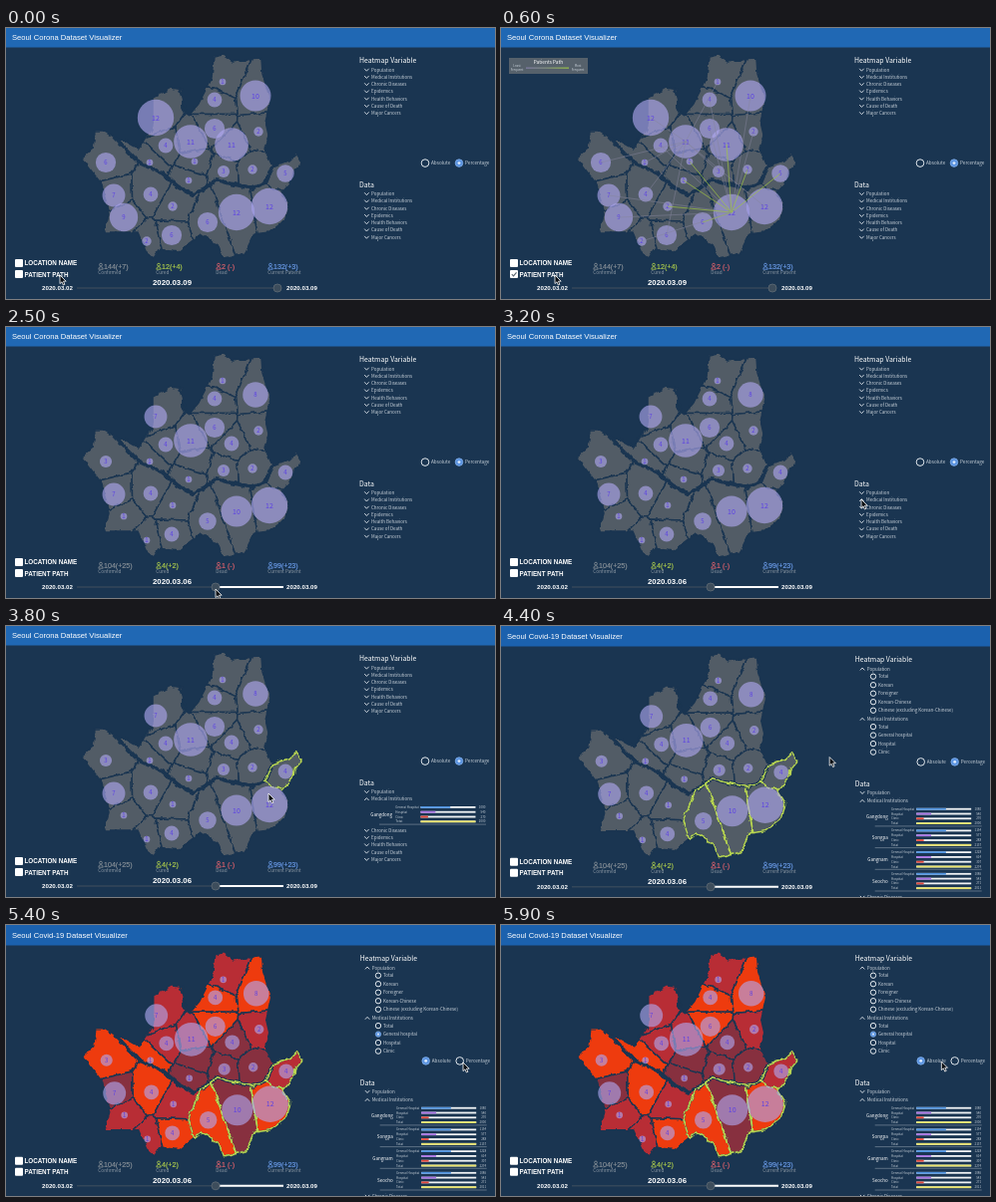
An HTML page for the animation above (6000 ms loop, 490x272 px).

```html
<!DOCTYPE html>
<html lang="en">
<head>
<meta charset="utf-8">
<title>Seoul Dataset Visualizer</title>
<style>
html, body { margin: 0; width: 100%; height: 100%; overflow: hidden; background: #1a3551; }
svg { display: block; width: 100vw; height: 100vh; }
text { white-space: pre; }
.n { font-family: "Noto Sans CJK KR", "Noto Sans CJK JP", "Noto Sans CJK", "Noto Sans", sans-serif; }
.h { font-family: "Liberation Sans", Arial, sans-serif; }
</style>
</head>
<body>
<svg id="stage" viewBox="0 0 490 272" xmlns="http://www.w3.org/2000/svg"></svg>
<script>
const LOOP = 6000, STEP = 100, CUT = 4300;
const BG = '#1a3551', PALE = '#c9d2da', BLUE = '#5a93e0';
const BOLD = 'font-weight="700"', MID = 'text-anchor="middle"', END = 'text-anchor="end"';
const lerp = (a, b, k) => a + (b - a) * k;

// River from west to east; both shores start at its east end and return to its west end.
const points = s => s.split(' ').map(p => p.split(',').map(Number));
const river = points('108,109 133,135 157,146 172,159 187,167 200,161 210,152 224,156 247,161 260,156 267,139');
const northShore = points('259,121 263,108 260,95 265,72 257,46 256,30 240,31 227,34 217,27 208,29 206,50 193,76 184,87 177,82 176,62 165,60 147,70 147,98 140,110 133,121 119,113');
const southShore = points('285,132 291,126 297,135 289,144 288,151 276,165 284,178 281,192 264,205 249,207 240,226 218,232 213,219 195,207 172,225 154,222 148,231 140,224 132,205 98,205 103,187 96,157 76,131 87,121 89,104 100,104');

// name, bubble centre, cases on day 6 and day 9
const north = `Dobong 217 54 1 1,Nowon 250 68 8 10,Gangbuk 209 72 4 4,Eunpyeong 150 90 7 12,Seongbuk 209 101 6 6,
Jungnang 253 104 2 2,Jongno 185 114 11 11,Dongdaemun 226 117 4 11,Seodaemun 160 118 4 4,Mapo 144 135 1 1,
Jung 189 134 0 1,Yongsan 183 153 1 1,Seongdong 218 144 3 3,Gwangjin 247 142 2 2`;
const south = `Gangdong 280 146 4 5,Songpa 264 179 12 12,Gangnam 231 185 10 12,Seocho 202 195 5 6,Gangseo 100 135 3 6,
Yangcheon 108 168 7 7,Guro 118 190 1 9,Yeongdeungpo 145 167 4 4,Dongjak 167 179 1 2,Geumcheon 141 214 1 2,Gwanak 166 208 4 6`;

// Keep the part of a polygon that is nearer to a than to b.
function nearer(poly, a, b) {
  const side = ([x, y]) => (x - (a.x + b.x) / 2) * (b.x - a.x) + (y - (a.y + b.y) / 2) * (b.y - a.y);
  return poly.flatMap((p, i) => {
    const q = poly[(i + 1) % poly.length], u = side(p), v = side(q), k = u / (u - v);
    const kept = u <= 0 ? [p] : [];
    if (u * v < 0) kept.push([lerp(p[0], q[0], k), lerp(p[1], q[1], k)]);
    return kept;
  });
}
function divide(list, shore) {
  const all = list.split(/,\s*/).map(row => {
    const [name, ...nums] = row.split(' '), [x, y, early, late] = nums.map(Number);
    return { name, x, y, early, late };
  });
  for (const a of all)
    a.shape = all.filter(b => b !== a).reduce((poly, b) => nearer(poly, a, b), [...shore, ...river]).join(' ');
  return all;
}
const districts = [...divide(north, northShore), ...divide(south, southShore)];
const find = name => districts.find(d => d.name === name);

// Heat classes; districts not listed are plain red.
const heat = {
  share: {
    '#5c3c4a': 'Dobong Nowon Gangseo Geumcheon',
    '#87303f': 'Guro Gwangjin Gangnam Seongdong Yongsan Jung Jongno',
    '#ee3b0e': 'Seodaemun Yangcheon Seocho Songpa Gangdong'
  },
  count: {
    '#87303f': 'Yangcheon Jung Seongdong Gwangjin Yongsan Gangnam Dongdaemun',
    '#ee3b0e': 'Nowon Gangbuk Seongbuk Mapo Gangseo Yeongdeungpo Gwanak Seocho Songpa'
  }
};
function heatOf(name, mode) {
  const hit = Object.entries(heat[mode]).find(([, names]) => names.split(' ').includes(name));
  return hit ? hit[0] : '#b82d35';
}

const picks = ['Gangdong', 'Songpa', 'Gangnam', 'Seocho'];
const topics = ['Population', 'Medical Institutions', 'Chronic Diseases', 'Epidemics', 'Health Behaviors', 'Cause of Death', 'Major Cancers'];

// time, x, y of the pointer tip
const pointer = [[0, 54, 248], [1600, 54, 248], [1900, 272, 262], [2400, 210, 263], [2600, 210, 263], [3200, 361, 173],
  [3600, 281, 150], [3800, 263, 168], [4200, 204, 196], [4500, 373, 109], [4700, 413, 121], [5000, 420, 136],
  [5400, 458, 138], [6000, 440, 137]];
function pointerAt(t) {
  const i = pointer.findIndex(p => p[0] > t);
  const [t0, x0, y0] = pointer[i - 1], [t1, x1, y1] = pointer[i];
  const k = (t - t0) / (t1 - t0), e = k * k * (3 - 2 * k);
  return [lerp(x0, x1, e), lerp(y0, y1, e)];
}

const text = (x, y, s, size, fill = '#fff', more = '', face = 'n') =>
  `<text class="${face}" x="${x}" y="${y + size * .36}" font-size="${size}" fill="${fill}" ${more}>${s}</text>`;
const sans = (x, y, s, size, fill, more) => text(x, y, s, size, fill, more, 'h');
const circle = (x, y, r, more) => `<circle cx="${x}" cy="${y}" r="${r}" ${more}/>`;
const rect = (x, y, w, h, fill, more = '') => `<rect x="${x}" y="${y}" width="${w}" height="${h}" fill="${fill}" ${more}/>`;
const line = (x1, y1, x2, y2, tint, w) => `<path d="M${x1} ${y1}L${x2} ${y2}" stroke="${tint}" stroke-width="${w}"/>`;
const shift = (x, y, body) => `<g transform="translate(${x} ${y})">${body}</g>`;

const topic = (y, name, open) => {
  const d = open ? 1.2 : -1.2;
  return `<path d="M359.2 ${y + d}l2.2 ${-2 * d}l2.2 ${2 * d}" fill="none" stroke="#dde4ea" stroke-width=".9"/>`
    + text(366, y, name, 4.5, PALE);
};
const radio = (x, y, r, on, name, size) => (on
  ? circle(x, y, r, `fill="${BLUE}" stroke="#86b3ee" stroke-width=".7"`) + circle(x, y, r * .38, 'fill="#dceafd"')
  : circle(x, y, r, 'fill="none" stroke="#e3e9ee" stroke-width="1"'))
  + text(x + r + 2.2, y, name, size, PALE);

// Everyone travels to one of two hubs; trips of middle length are the frequent ones.
function trips() {
  const hubs = [find('Gangnam'), find('Jongno')];
  return districts.map((d, i) => {
    const hub = hubs[i % 3 ? 0 : 1], far = Math.hypot(d.x - hub.x, d.y - hub.y);
    const often = i % 3 && far > 30 && far < 75;
    return line(d.x, d.y, hub.x, hub.y, often ? '#9fc544' : '#85859c', often ? .7 : .5);
  }).join('');
}

function mapView(s) {
  let land = '', bubbles = '';
  for (const d of districts) {
    const fill = s.heat ? heatOf(d.name, s.count ? 'count' : 'share') : '#525c66';
    land += `<polygon points="${d.shape}" fill="${fill}" stroke="${BG}" stroke-width="1.5"/>`;
    const n = Math.round(lerp(d.early, d.late, (s.day - 6) / 3));
    if (n) bubbles += circle(d.x, d.y, 2 + 1.35 * n, 'fill="#b0a8f0" fill-opacity=".62"')
      + text(d.x, d.y, n, n > 9 ? 7 : 6, '#5b40e4', MID);
  }
  land += `<polyline points="${river.join(' ')}" fill="none" stroke="${BG}" stroke-width="4"/>`;
  for (const name of s.picked)
    land += `<polygon points="${find(name).shape}" fill="none" stroke="#b9d651" stroke-width="1.5"/>`;
  return `<g stroke-linejoin="round" filter="url(#rough)">${land}</g>` + bubbles + (s.paths ? trips() : '');
}

function legend() {
  const label = (x, a, b) => text(x, 38.3, a, 3, PALE, MID) + text(x, 41.6, b, 3, PALE, MID);
  return rect(8, 30, 79, 16, '#56616b') + text(47.5, 34, 'Patients Path', 4.8, '#fff', MID)
    + label(16, 'Least', 'Frequent') + label(77, 'Most', 'Frequent') + rect(25, 39.6, 43, 1, 'url(#freq)');
}

function heatPanel(s) {
  const title = text(354, 33, 'Heatmap Variable', 6.9);
  if (!s.cut) return title + topics.map((n, i) => topic(42 + i * 7.25, n)).join('');
  const options = (y, names) => names.map((n, i) =>
    radio(372.3, y + i * 8.5, 2.7, s.heat && n === 'General hospital', n, 4.5)).join('');
  return title + topic(42.4, topics[0], true) + topic(92.7, topics[1], true)
    + options(49.9, ['Total', 'Korean', 'Foreigner', 'Korean-Chinese', 'Chinese (excluding Korean-Chinese)'])
    + options(100.3, ['Total', 'General hospital', 'Hospital', 'Clinic']);
}

const barTints = { 'General Hospital': '#4f93e0', Hospital: '#a873e4', Clinic: '#e4483c', Total: '#e9e36c' };
function bars(y, name, n) {
  const total = 2000 + n * 137 % 400;
  let out = text(387, y + 7.3, name, 4.5, '#fff', END) + line(374, y + 17.2, 481, y + 17.2, '#9fabb6', .5);
  Object.entries(barTints).forEach(([head, tint], i) => {
    const v = y + i * 4.8, share = head === 'Total' ? 1 : .54 / 2 ** i;
    out += text(390.3, v, head, 3, PALE) + rect(415.5, v - .9, 55, 1.8, '#f1f4f6')
      + rect(415.5, v - .9, 55 * share, 1.8, tint) + text(480.5, v, Math.round(total * share), 3, PALE, END);
  });
  return out;
}

function dataPanel(s) {
  const med = s.cut ? 174.8 : 173.8, n = s.picked.length;
  const rest = med + (n ? 9.7 + 21.7 * n : 7.25);
  return text(354, 158, 'Data', 6.9) + topic(166.5, topics[0]) + topic(med, topics[1], s.open)
    + s.picked.map((name, i) => bars(med + 8.1 + i * 21.7, name, i)).join('')
    + topics.slice(2).map((name, i) => topic(rest + i * 7.25, name)).join('');
}

function footer(s) {
  const at = (a, b) => Math.round(lerp(a, b, (s.day - 6) / 3));
  const cured = at(4, 12), dead = at(1, 2), all = at(104, 144);
  const stats = [
    [92, 'Confirmed', '#8b939a', `${all}(+${at(25, 7)})`],
    [150, 'Cured', '#b2d14c', `${cured}(+${at(2, 4)})`],
    [210, 'Dead', '#e3636c', `${dead} (-)`],
    [262, 'Current Patient', '#6d9fee', `${all - cured - dead + (s.day > 8 ? 2 : 0)}(+${at(23, 3)})`]
  ];
  let out = '';
  ['LOCATION NAME', 'PATIENT PATH'].forEach((name, i) =>
    out += rect(9, 232 + i * 11, 8, 8, '#fff', 'rx="1"') + sans(18.5, 236.2 + i * 11.2, name, 6.3, '#fff', BOLD));
  if (s.paths) out += '<path d="M10.8 247.2l1.7 1.7l3-3.6" fill="none" stroke="#5b6670" stroke-width="1.1"/>';
  for (const [x, name, tint, value] of stats)
    out += circle(x + 3, 237.6, 1.4, `fill="none" stroke="${tint}" stroke-width=".8"`)
      + `<path d="M${x + .8} 242.2q0-2.6 2.2-2.6t2.2 2.6z" fill="none" stroke="${tint}" stroke-width=".8"/>`
      + sans(x + 6, 239.7, value, 7.1, tint, `stroke="${tint}" stroke-width=".15"`)
      + text(x + .3, 245.8, name, 4.7, '#8e9aa5');
  out += sans(166.5, 255, '2020.03.0' + s.day, 7.8, '#fff', BOLD + ' ' + MID)
    + sans(36, 260.7, '2020.03.02', 6.2, '#fff', BOLD) + sans(281, 260.7, '2020.03.09', 6.2, '#fff', BOLD)
    + line(71, 261, s.knob, 261, '#34475a', 1.6);
  if (s.knob < 271) out += line(s.knob, 261, 278, 261, '#fff', 2);
  return out + circle(s.knob, 261, 4, 'fill="#3d4d5c" stroke="#56636f" stroke-width="1"');
}

function state(t) {
  const [x, y] = pointerAt(t);
  const knob = t < 1900 ? 272 : t < 2400 ? x : 210;
  return {
    x, y, knob,
    day: Math.min(9, 2 + Math.floor((knob - 71) / 28.7)),
    cut: t >= CUT,
    paths: t >= 300 && t < 1600,
    open: t >= 3200,
    heat: t >= 4500,
    count: t >= 5000 && t < 5500 || t >= 5700,
    picked: picks.filter((p, i) => t >= 3600 + i * 210)
  };
}

const defs = `<defs><linearGradient id="freq"><stop stop-color="#8a83b4"/><stop offset=".45" stop-color="#8c9a88"/><stop offset="1" stop-color="#a8d83c"/></linearGradient>
<filter id="rough" filterUnits="userSpaceOnUse" x="60" y="20" width="250" height="220" color-interpolation-filters="sRGB">
<feTurbulence type="fractalNoise" baseFrequency=".14" numOctaves="2" seed="4"/>
<feDisplacementMap in="SourceGraphic" scale="5" xChannelSelector="R" yChannelSelector="G"/></filter></defs>`;

function scene(t) {
  const s = state(t);
  const title = `Seoul ${s.cut ? 'Covid-19' : 'Corona'} Dataset Visualizer`;
  const [dx, dy] = s.cut ? [.7, .8] : [0, 0];
  return defs + rect(0, 0, 490, 272, BG)
    + rect(0, 0, 490, s.cut ? 20.5 : 19.5, s.cut ? '#1b61ae' : '#2068b4')
    + sans(6, 9.2 + dy, title, 7.65)
    + shift(dx, dy, mapView(s) + (s.paths ? legend() : '') + heatPanel(s)
      + radio(420, 135.6, 3.8, s.count, 'Absolute', 4.7) + radio(454, 135.6, 3.8, !s.count, 'Percentage', 4.7)
      + dataPanel(s))
    + shift(0, dy, footer(s))
    + shift(s.x, s.y, '<path d="M0 0V8.6L2 6.8L3.4 10L4.9 9.3L3.5 6.2H6.2Z" fill="#0b0f14" stroke="#fff" stroke-width=".8" stroke-linejoin="round"/>');
}

const stage = document.getElementById('stage');
const start = performance.now();
let last = -1;
function tick() {
  const t = Math.floor((performance.now() - start) % LOOP / STEP) * STEP;
  if (t !== last) stage.innerHTML = scene(last = t);
  requestAnimationFrame(tick);
}
tick();
</script>
</body>
</html>
```
